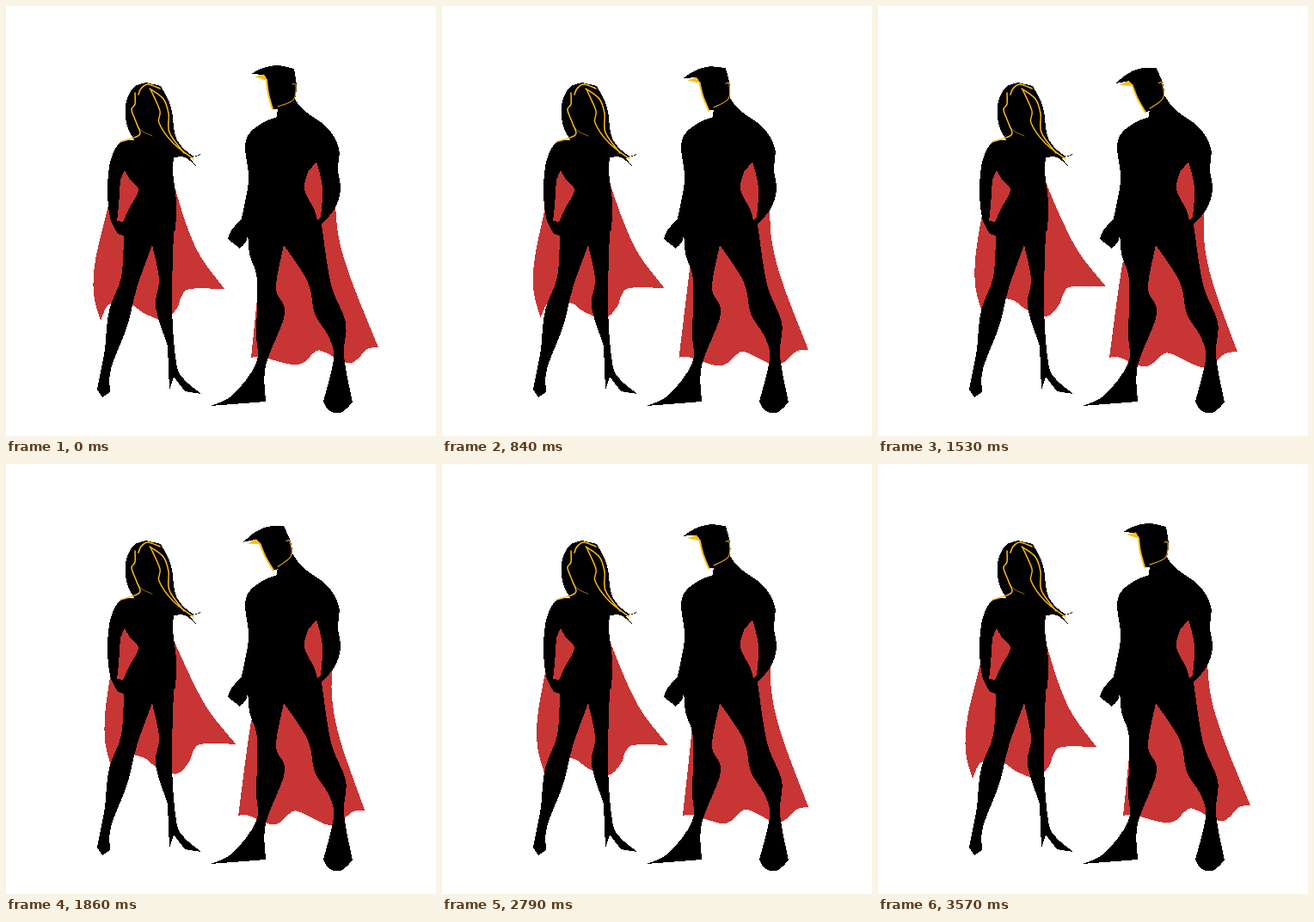
Write an HTML page that moves like this. It is 500 px wide and 500 px high and loops after 3.6 s.

```html
<!DOCTYPE html>
<html lang="en">
<head>
<meta charset="utf-8">
<title>Two heroes</title>
<style>
  html, body { margin: 0; width: 100%; height: 100%; overflow: hidden; background: #fff; }
  svg { display: block; width: 100vw; height: 100vh; }
  .cape { fill: #c83535; shape-rendering: crispEdges; }
  .body { fill: #000; fill-rule: evenodd; shape-rendering: crispEdges; }
  .line { fill: none; stroke: #ffbd16; stroke-linecap: round; stroke-linejoin: round; }
  .gold { fill: #ffbd16; }
</style>
</head>
<body>
<svg id="stage" viewBox="0 0 500 500"></svg>
<script>
const LOOP = 3600, STEP = 30, { PI, sin, cos, min, max } = Math;
const stage = document.getElementById('stage');

function add(tag, attrs, parent = stage) {
  const el = document.createElementNS('http://www.w3.org/2000/svg', tag);
  for (const key in attrs) el.setAttribute(key, attrs[key]);
  return parent.appendChild(el);
}

// "x,y x,y | x,y": smooth runs, with a corner at the point before each bar.
const parse = text => text.split('|').map(run =>
  run.trim().split(/\s+/).map(p => p.split(',').map(Number)));

function trace(runs) {
  let d = '', last = null;
  for (const run of runs) {
    const p = last ? [last, ...run] : run;
    if (!last) d += 'M' + p[0];
    for (let i = 0; i < p.length - 1; i++) {
      const a = p[i], b = p[i + 1], before = p[i - 1] || a, after = p[i + 2] || b;
      const c1 = a.map((v, k) => (v + (b[k] - before[k]) / 6).toFixed(2));
      const c2 = b.map((v, k) => (v - (after[k] - a[k]) / 6).toFixed(2));
      d += `C${c1} ${c2} ${b}`;
    }
    last = p[p.length - 1];
  }
  return d;
}
const shape = (parent, ...parts) =>
  add('path', { class: 'body', d: parts.map(p => trace(parse(p)) + 'Z').join('') }, parent);
const line = (text, width, parent) =>
  add('path', { class: 'line', d: trace(parse(text)), 'stroke-width': width }, parent);

// Rises to 1 at the peak time and returns to 0 at the end of the loop.
function sway(t, peak) {
  const u = t < peak ? t / peak : (LOOP - t) / (LOOP - peak);
  return (1 - cos(PI * u)) / 2;
}

// Cloth pinned at the top; h is 0 at the pin and 1 at the hem, s runs left to right.
function cape(rest, { left, width, top, drop, peak, swing }) {
  const runs = parse(rest), el = add('path', { class: 'cape' });
  return t => el.setAttribute('d', trace(runs.map(run => run.map(([x, y]) => {
    const s = (x - left) / width, h = min(1, max(0, (y - top) / drop));
    const k = sway(t, peak(s)), [dx, dy] = swing(s, h);
    return [+(x + dx * k).toFixed(2), +(y + dy * k).toFixed(2)];
  }))) + 'Z');
}

const herCape = cape(
  `138,180 | 190,190 | 195,207 210,255 226,291 254,329 |
   214,329 204,338 199,351 184,365 160,357 147,348 127,345 117,350 110,366 | 102,335 104,295 119,232 124,205`,
  { left: 102, width: 152, top: 200, drop: 150, peak: () => 2200,
    swing: (s, h) => [14.5 * sin(PI / 2 * h), -h * (4 + 8 * (1 - s) ** 3)] });

const hisCape = cape(
  `340,170 | 375,170 | 382,222 387,270 402,320 433,397 |
   420,399 408,411 396,415 367,401 357,404 347,414 332,417 297,408 285,409 | 292,340 295,300`,
  { left: 285, width: 148, top: 200, drop: 210, peak: s => 1500 + 300 * s,
    swing: (s, h) => [-16 * sin(PI / 2 * h) - 14 * h ** 4 * sin(PI * s) ** 2, 6 * s * h] });

// Woman
shape(stage,
  `155,156 134,158 122,178 118,212 121,246 130,265 | 137,267 | 134,315 120,354 115,400 | 106,446 | 112,455 | 121,449 |
   122,422 141,372 152,328 170,278 | 178,318 174,350 188,395 | 190,447 | 195,431 | 208,448 | 227,451 |
   207,434 198,415 193,350 195,262 | 197,261 | 198,228 194,192 195,165 185,148`,
  `138,191 | 145,203 154,214 143,236 136,251 | 129,250 | 131,232 133,202`);
shape(stage,
  `163,89 148,95 139,115 141,140 150,157 | 170,165 | 195,176 | 208,176 221,186 | 214,177 | 229,171 |
   217,174 198,154 192,118 180,93`);
line('154,103 157,96 165,91 179,96', 1.6);
line('150,101 150,114 146,121 152,137 155,150 133,158', 1.5);
line('167,96 183,108 189,125 190,147 207,171', 1.5);
line('168,97 179,122 178,136 194,159 218,178', 1.4);
line('153,140 159,146 170,151', 0.6);

// Man
shape(stage,
  `316,117 | 315,129 | 300,135 284,147 278,164 282,202 274,247 | 262,261 258,271 | 272,282 | 280,272 281,254 |
   283,288 292,318 291,380 291,415 264,452 238,465 | 302,460 | 302,418 324,358 314,328 323,278 |
   351,321 359,358 375,384 381,410 369,460 | 375,470 389,473 403,461 | 393,407 395,368 378,324 367,254 |
   382,236 389,214 386,190 387,165 373,141 346,121 333,104`,
  `361,181 | 368,211 366,246 | 362,249 | 358,236 347,213 351,193`);
const head = add('g');
shape(head, '285,79 299,72 316,69 335,73 | 338,95 335,112 | 326,118 310,120 | 305,102 303,85 | 300,80');
add('path', { class: 'gold', d: 'M289 82L300 79.5L304 87Z' }, head);
line('303,86 305,102 310,120', 2, head);
line('333,91 337,92 334,109 316,117', 1, head);

function draw(now) {
  const t = Math.floor(now % LOOP / STEP) * STEP;
  herCape(t);
  hisCape(t);
  head.setAttribute('transform', `rotate(${-15 * sway(t, LOOP / 2)} 325 118)`);
}

const start = performance.now();
function tick() {
  draw(performance.now() - start);
  requestAnimationFrame(tick);
}
tick();
</script>
</body>
</html>
```
